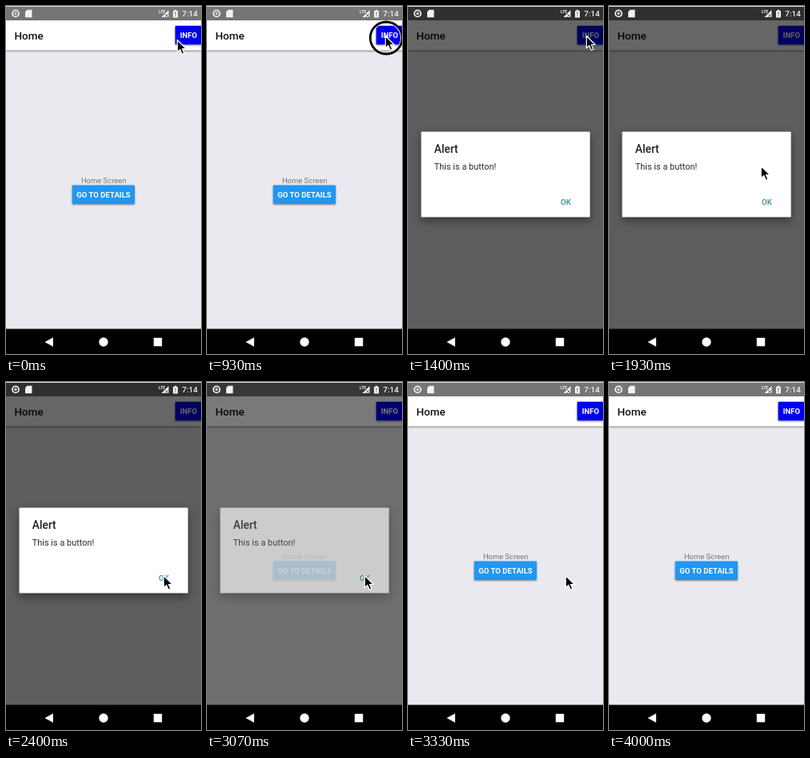
Write an HTML page that moves like this. It is 244 by 436 pixels and loops after 5.07 s.

```html
<!DOCTYPE html>
<html lang="en">
<head>
<meta charset="utf-8">
<title>Header button alert</title>
<style>
  html, body { margin: 0; height: 100%; overflow: hidden; background: #e9e9ef; }
  svg { display: block; width: 244px; height: 436px; }
  text { font: 400 9.45px Roboto, sans-serif; }
  .medium { font-weight: 500; }
  .bold { font-weight: 700; font-size: 9.6px; }
  .raised { filter: drop-shadow(0 1px 1.2px #0007); }
  .dialog { filter: drop-shadow(0 5px 6px #0006); }
</style>
</head>
<body>
<svg viewBox="0 0 244 436">
  <!-- app screen -->
  <rect width="244" height="436" fill="#e9e9ef"/>
  <rect class="raised" y="17" width="244" height="38.5" fill="#fff"/>
  <rect y="1" width="244" height="17" fill="#757575"/>
  <text class="medium" x="10.4" y="42" style="font-size:13.5px" fill="#111">Home</text>
  <rect class="raised" x="211.7" y="24.7" width="33" height="23.5" rx="1" fill="#0000f0"/>
  <text class="bold" x="228.4" y="40.4" text-anchor="middle" fill="#fff">INFO</text>
  <text x="122.2" y="221.5" text-anchor="middle" fill="#757575">Home Screen</text>
  <rect class="raised" x="82.8" y="224.6" width="78.2" height="23.5" rx="1" fill="#2196f3"/>
  <text class="bold" x="122" y="240.4" text-anchor="middle" fill="#fff">GO TO DETAILS</text>

  <rect id="scrim" y="1" width="244" height="405"/>
  <rect width="244" height="1" fill="#ddd"/>

  <!-- status icons -->
  <g fill="#f2f2f2">
    <circle cx="12" cy="9.4" r="4" fill="none" stroke="#eee" stroke-width="1.8"/>
    <circle cx="12" cy="9.4" r="1.8" fill="#ccc"/>
    <path d="M26.5 4.8h6v9.4h-8.5V7.3z"/>
    <text class="bold" x="191" y="9" style="font-size:5px">LTE</text>
    <path d="M203.5 5v9h-9z"/>
    <path d="M199 10l4 4m0-4l-4 4" stroke="#757575"/>
    <path d="M209 6h1.7V4.8h2.6V6h1.7v8.5h-6z"/>
    <path d="M212 7.5v3m0 1v1.3" stroke="#666" stroke-width="1.2"/>
    <text class="medium" x="220.3" y="13" style="font-size:9.9px">7:14</text>
  </g>

  <!-- navigation bar -->
  <rect y="404.5" width="244" height="32"/>
  <g fill="#fff">
    <path d="M48.5 421l10.5-5.7v11.4z"/>
    <circle cx="122" cy="421" r="5.7"/>
    <rect x="184.8" y="415.8" width="10.4" height="10.4" rx=".5"/>
  </g>

  <g id="dialog">
    <rect class="dialog" x="16.5" y="157.4" width="211.2" height="107.2" rx="1.2" fill="#fff"/>
    <text class="medium" x="32.8" y="184.4" style="font-size:13.8px" fill="#222">Alert</text>
    <text x="32.8" y="204.9" style="font-size:10.95px" fill="#2c2c2c">This is a button!</text>
    <text class="medium" x="191" y="249" style="font-size:9.7px" fill="#32899b">OK</text>
  </g>

  <g id="cursor">
    <g id="ring" fill="none">
      <circle cx="1" cy="2.5" r="18.5" stroke="#fff" stroke-width="1.5"/>
      <circle cx="1" cy="2.5" r="20" stroke="#000" stroke-width="2.8"/>
    </g>
    <path d="M0 0V15.2L3.5 12 6 17.8 8.6 16.7 6.2 11H11z" stroke="#fff" stroke-width="1.2" stroke-linejoin="round"/>
  </g>
</svg>
<script>
  const FPS = 15, LOOP = 5070;
  const el = id => document.getElementById(id);
  const scrim = el('scrim'), dialog = el('dialog'), cursor = el('cursor'), ring = el('ring');

  // Times are counted in steps of 1/15 s.
  const OPEN = 17, CLOSE = 45, LEAVE = 60;

  const ramp = (k, from, to) => Math.min(1, Math.max(0, (k - from) / (to - from)));
  const smooth = (k, from, to) => {
    const u = ramp(k, from, to);
    return u * u * (3 - 2 * u);
  };
  const pressed = (k, end) => k >= end - 3 && k < end;

  function draw(ms) {
    const k = Math.floor((ms % LOOP + 4) * FPS / 1000);

    // the dialog fades faster than the dimming behind it
    scrim.style.opacity = .6 * (ramp(k, OPEN, OPEN + 4) ** 1.4 - smooth(k, CLOSE, CLOSE + 4.5));
    dialog.style.opacity = smooth(k, OPEN, OPEN + 3) - smooth(k, CLOSE, CLOSE + 2.5);

    // pointer: to INFO, down over the dialog, on to OK, then to the blue button
    const info = smooth(k, 0, 3), down = smooth(k, 21, 29), ok = smooth(k, 29, 36), back = smooth(k, 51, 54);
    const x = 214.3 + 9 * info - 33 * down + 7 * ok - 102 * back;
    const y = 42.5 - 5 * info + 163 * down + 42 * ok - 8 * back;
    cursor.setAttribute('transform', `translate(${x} ${y})`);
    cursor.style.display = k < LEAVE ? '' : 'none';
    ring.style.display = pressed(k, OPEN) || pressed(k, CLOSE) ? '' : 'none';
  }

  const start = performance.now();
  function tick() {
    draw(performance.now() - start);
    requestAnimationFrame(tick);
  }
  tick();
</script>
</body>
</html>
```
